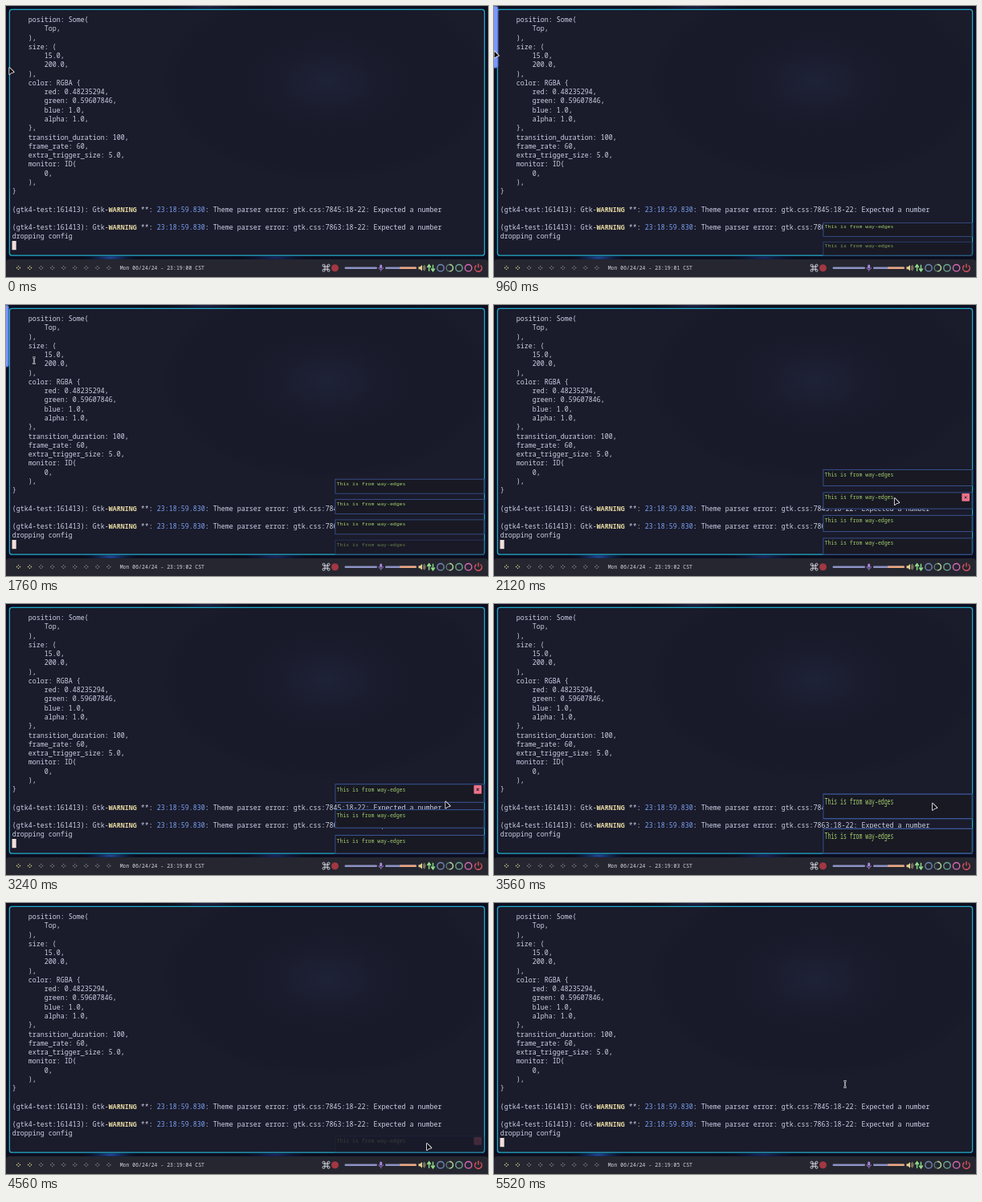
Animation of 600 by 338 pixels, one loop 5.56 s. Source, as an HTML page with a canvas:

```html
<!DOCTYPE html>
<html lang="en">
<head>
<meta charset="utf-8">
<title>Terminal notifications</title>
<style>
html, body { margin: 0; width: 100%; height: 100%; overflow: hidden; background: #0b0d20; }
canvas { display: block; }
</style>
</head>
<body>
<canvas id="stage" width="600" height="338"></canvas>
<script>
const c = document.getElementById('stage').getContext('2d');
const LOOP = 5560, MONO = '"Noto Sans Mono", monospace';
const LINE = 11.27, CHAR = 5;

const config = `    position: Some(
        Top,
    ),
    size: (
        15.0,
        200.0,
    ),
    color: RGBA {
        red: 0.48235294,
        green: 0.59607846,
        blue: 1.0,
        alpha: 1.0,
    },
    transition_duration: 100,
    frame_rate: 60,
    extra_trigger_size: 5.0,
    monitor: ID(
        0,
    ),
}`.split('\n');

// Notification stack: [time, change in count]
const stackEvents = [[600, 1], [850, 1], [1375, 1], [1680, 1], [3140, -1], [3550, -1], [4020, -1], [4600, -1]];
// Pointer path: [time, x, y]
const path = [[0, 4.3, 77], [360, .5, 56.5], [1700, .5, 56.5], [2080, 498.8, 241], [2160, 498.8, 241],
  [2400, 545, 216], [2600, 545, 216], [2900, 548, 219], [3200, 547.3, 246.5], [3500, 547.3, 246.5],
  [3850, 531, 274.7], [4000, 531, 274.7], [4350, 524, 300], [4600, 524, 300], [5360, 437, 226], [LOOP, 437, 226]];
const presses = [[560, 680], [820, 920], [1350, 1500], [1650, 1720]];
const cursorHidden = [[840, 1340], [2320, 2820], [3320, 3820], [4320, 4820]];

const clamp = v => Math.min(1, Math.max(0, v));
const lerp = (a, b, u) => a + (b - a) * u;
const easeOut = u => 1 - (1 - clamp(u)) ** 5;
const smooth = u => u * u * (3 - 2 * u);
const within = (spans, t) => spans.some(([a, b]) => t >= a && t < b);

function rect(x, y, w, h, fill, r = 0) {
  c.fillStyle = fill;
  c.beginPath();
  c.roundRect(x, y, w, h, r);
  c.fill();
}
function ring(x, y, r, color, width = 1.1, from = 0, to = 2 * Math.PI) {
  c.strokeStyle = color;
  c.lineWidth = width;
  c.beginPath();
  c.arc(x, y, r, from, to);
  c.stroke();
}
function shape(d, color, width) {
  const p = new Path2D(d);
  if (width) {
    c.strokeStyle = color;
    c.lineWidth = width;
    c.stroke(p);
  } else {
    c.fillStyle = color;
    c.fill(p);
  }
}
function text(s, x, y, color, size = 8.333, weight = 400) {
  c.font = `${weight} ${size}px ${MONO}`;
  c.fillStyle = color;
  c.fillText(s, x, y);
}
function glow(x, y, r, color, squash = 1) {
  c.save();
  c.translate(x, y);
  c.scale(1, squash);
  const g = c.createRadialGradient(0, 0, 0, 0, 0, r);
  g.addColorStop(0, color);
  g.addColorStop(1, 'transparent');
  c.fillStyle = g;
  c.fillRect(-r, -r, 2 * r, 2 * r);
  c.restore();
}

function pointerAt(t) {
  const i = path.findIndex(p => p[0] > t), [t0, x0, y0] = path[i - 1], [t1, x1, y1] = path[i];
  const u = smooth((t - t0) / (t1 - t0));
  return { x: lerp(x0, x1, u), y: lerp(y0, y1, u) };
}

const stackHeight = n => 28.5 * n - 7.5;
function stackAt(t) {
  const s = { count: 0, from: 0, to: 0, start: 0, added: 0 };
  const height = time => lerp(s.from, s.to, easeOut((time - s.start) / 500));
  for (const [time, change] of stackEvents) {
    if (time > t) break;
    s.from = s.count ? height(time) : stackHeight(1);
    s.count += change;
    s.to = stackHeight(s.count);
    s.start = time;
    if (change > 0) s.added = time;
  }
  s.height = height(t);
  const next = stackEvents.find(e => e[0] > t);
  s.leaving = next && next[1] < 0 ? clamp((next[0] - t) / 200) : 1;
  s.entering = clamp((t - s.added) / 150);
  return s;
}

function drawDesktop() {
  rect(0, 0, 600, 338, '#0c0e20');
  glow(130, 314, 42, '#2450a8', .15);
  glow(335, 314, 60, '#1c2c66', .12);
  glow(250, 1, 90, '#20234a', .08);
  rect(4, 4, 592, 307.5, '#1a1b2b', 3);
  glow(400, 95, 210, 'rgba(38,46,76,.4)', .6);
  c.strokeStyle = '#20abc9';
  c.lineWidth = 1.3;
  c.beginPath();
  c.roundRect(4.4, 4.4, 591.2, 306.8, 3);
  c.stroke();
}

function drawWarning(row, place) {
  const y = 20 + row * LINE, at = n => 7.7 + n * CHAR;
  text('(gtk4-test:161413): Gtk-', at(0), y, '#cdd3e6');
  text('WARNING', at(24), y, '#e6d9a2', 8.333, 700);
  text('**:', at(32), y, '#cdd3e6');
  text('23:18:59.830', at(36), y, '#7aa2f0');
  text(`: Theme parser error: gtk.css:${place}:18-22: Expected a number`, at(48), y, '#cdd3e6');
}

function drawTerminal(t) {
  config.forEach((s, i) => {
    const body = s.trimStart();
    text(body, 7.7 + (s.length - body.length) * CHAR, 20 + i * LINE, '#cdd3e6');
  });
  drawWarning(21, 7845);
  drawWarning(23, 7863);
  text('dropping config', 7.7, 20 + 24 * LINE, '#cdd3e6');
  if (!within(cursorHidden, t)) rect(7.5, 293, 5.2, 11.2, '#f0dfdb');
}

function drawBar(t) {
  rect(0, 316, 600, 26, '#25262f', 4);
  for (let i = 0; i < 9; i++) {
    const x = 15.5 + i * 14.05, color = i < 2 ? '#d9cf9a' : '#858793';
    for (const [dx, dy] of [[0, -1.9], [1.9, 0], [0, 1.9], [-1.9, 0]])
      rect(x + dx - .7, 326.5 + dy - .7, 1.4, 1.4, color, .5);
  }
  const second = t < 760 ? 0 : 1 + Math.floor((t - 760) / 1000);
  text(`Mon 06/24/24 - 23:19:0${second} CST`, 141.7, 329, '#d3d6e2', 6.5);

  for (const [dx, dy] of [[-3, -3], [3, -3], [-3, 3], [3, 3]])
    ring(398.5 + dx, 326.7 + dy, 1.5, '#d5d7e0', .9);
  shape('M397 323.7v6M400 323.7v6M395.5 325.2h6M395.5 328.2h6', '#d5d7e0', .9);
  c.fillStyle = '#a33742';
  c.beginPath();
  c.arc(409.5, 326.7, 4.5, 0, 7);
  c.fill();

  rect(421.5, 325.5, 40.5, 2.4, '#8d92c6', 1.2);
  rect(465.2, 322.5, 3, 5, '#a884e0', 1.5);
  shape('M463.9 326a2.8 2.8 0 0 0 5.6 0M466.7 329v2', '#a884e0', .8);
  rect(472, 325.5, 39, 2.4, '#8d92c6', 1.2);
  rect(490, 325.5, 21, 2.4, '#eda67f', 1.2);
  shape('M513.5 325.2h2l2.5-2.3v7.6l-2.5-2.3h-2z', '#e3cf94');
  shape('M519.3 324.5q1.6 2.2 0 4.4M520.6 323.2q2.4 3.5 0 7', '#e3cf94', .8);
  shape('M524.3 326l2.3-3.2 2.3 3.2M526.6 323v7.7M529.2 327.5l2.3 3.2 2.3-3.2M531.5 330.5v-7.7', '#8fe08a', 1.4);

  ring(541, 326.7, 4.2, '#7089b5', 1.4);
  ring(552.3, 326.7, 4.2, '#5f7779', 1.4);
  ring(552.3, 326.7, 4.2, '#b3d591', 1.4, -1.6, 1.6);
  ring(564, 326.7, 4.2, '#6da596', 1.4);
  ring(575.6, 326.7, 4.2, '#d667b4', 1.4);
  ring(588, 327, 4.3, '#e0525f', 1.4, -.95, 4.1);
  shape('M588 321.6v5', '#e0525f', 1.4);
}

function drawEdgeButton(t) {
  const show = clamp((t - 300) / 100) * (1 - clamp((t - 1730) / 100));
  if (!show) return;
  const x = -5.6 * (1 - show), down = within(presses, t);
  rect(x - 4, 0, 9.4, 77.5, down ? '#4c5da6' : '#6078d2', [0, 3, 3, 0]);
  rect(x - 4, 1, 8, 75.3, down ? '#6076c6' : '#7b98ff', [0, 2, 2, 0]);
}

function drawNotification(top, alpha, hovered) {
  c.globalAlpha = alpha;
  rect(409.5, top, 186, 21, '#181923');
  c.strokeStyle = '#3a5697';
  c.lineWidth = .9;
  c.strokeRect(409.9, top + .4, 185.2, 20.2);
  text('This is from way-edges', 411.6, top + 8.8, '#a3cd6c', 6.5);
  if (hovered) {
    rect(582.4, top + 1.6, 9.6, 9.6, '#ee7289', 1);
    shape(`M585.8 ${top + 5}l2.8 2.8m0-2.8l-2.8 2.8`, '#1a1b26', .9);
  }
  c.globalAlpha = 1;
}

// The whole stack is stretched towards its new height, anchored at the bottom.
function drawStack(stack, pointer) {
  if (!stack.count) return;
  c.save();
  c.translate(0, 311.5);
  c.scale(1, stack.height / stack.to);
  for (let i = 0; i < stack.count; i++) {
    const top = i * 28.5 - stack.to, y = pointer.y - 311.5 - top;
    const alpha = (i ? 1 : stack.leaving) * (i === stack.count - 1 ? stack.entering : 1);
    drawNotification(top, alpha, pointer.x > 409 && y >= 0 && y <= 21.5);
  }
  c.restore();
}

function drawPointer({ x, y }, stack) {
  const overStack = stack.count && x > 409 && y > 311.5 - stack.height;
  c.save();
  c.translate(x, y);
  c.lineJoin = 'round';
  if (x < 6 || overStack) {
    const arrow = 'M0 0V8.2L2.4 6.2 5.4 5.4Z';
    shape(arrow, '#f2f2f5', 1.7);
    shape(arrow, '#0b0b10');
  } else {
    const beam = 'M-1.7-3.7H1.7M-1.7 3.7H1.7M0-3.7V3.7';
    shape(beam, '#e8e8ee', 1.9);
    shape(beam, '#15151d', .7);
  }
  c.restore();
}

function frame() {
  const t = performance.now() % LOOP, pointer = pointerAt(t), stack = stackAt(t);
  drawDesktop();
  drawTerminal(t);
  drawBar(t);
  drawEdgeButton(t);
  drawStack(stack, pointer);
  drawPointer(pointer, stack);
  requestAnimationFrame(frame);
}
frame();
</script>
</body>
</html>
```
